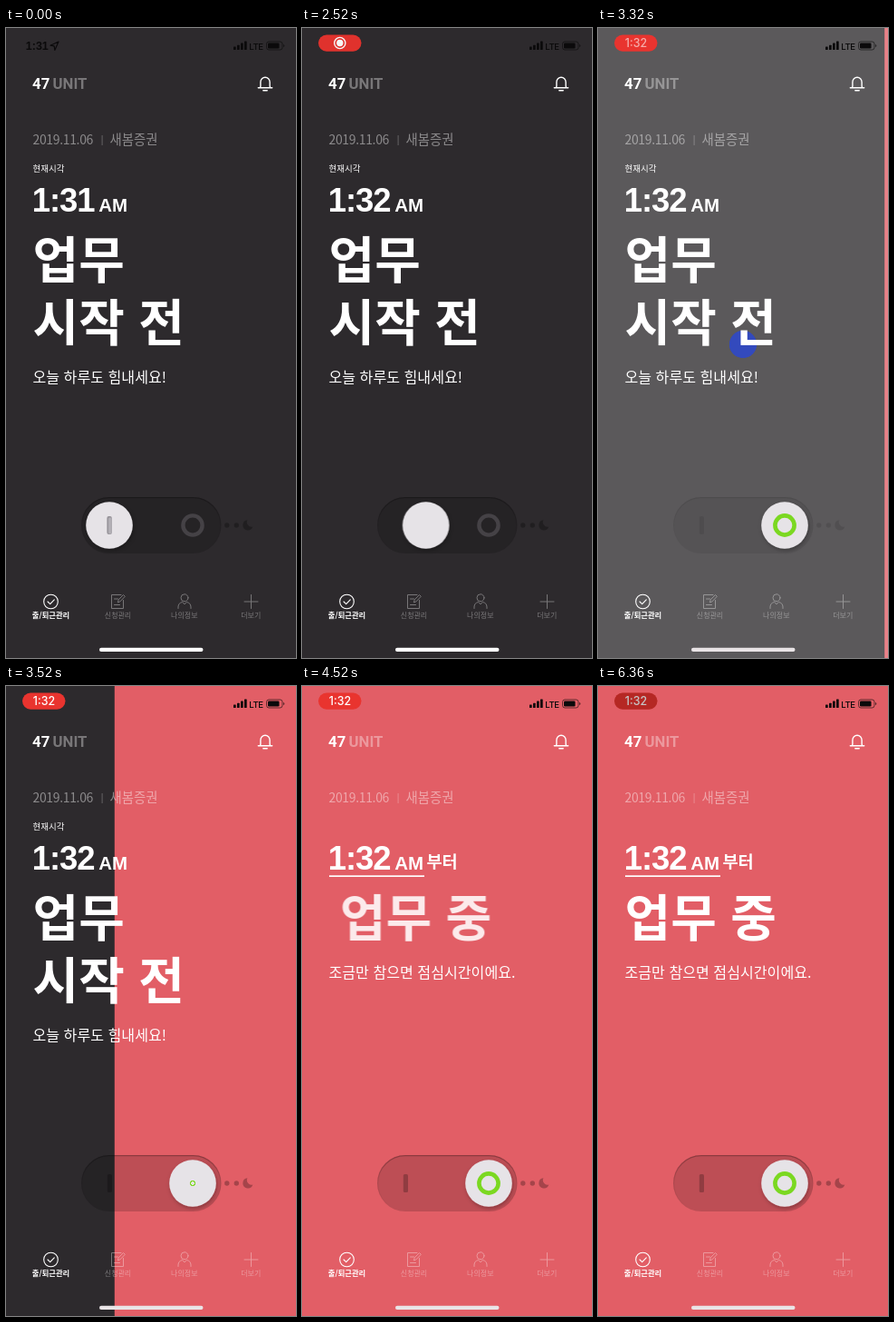
Animation, 320 px wide and 693 px high, one loop 6400 ms. Source, as an HTML page:

```html
<!DOCTYPE html>
<html lang="ko">
<head>
<meta charset="utf-8">
<title>출퇴근 스위치</title>
<style>
  html, body { margin: 0; width: 100%; height: 100%; overflow: hidden; background: #2d2a2d; }
  svg { display: block; width: 100%; height: 100%; }
  text { fill: #fff; font-family: "Noto Sans CJK KR", "Noto Sans CJK", sans-serif; }
  .latin { font-family: "Liberation Sans", Arial, sans-serif; font-weight: 700; }
  .logo { font: 700 16.8px Roboto, sans-serif; }
  .head { font-size: 55px; font-weight: 700; }
  .sub { font-size: 16.1px; font-weight: 300; }
  .date { font-size: 14.4px; font-weight: 300; }
  .tab { font-size: 8px; text-anchor: middle; }
  .dim { opacity: .36; }
  .line { fill: none; stroke: #fff; stroke-linecap: round; stroke-linejoin: round; }

  /* One loop is 6400 ms: 1% = 64 ms */
  .a { animation: 6400ms linear infinite both; }
  #clockOld, #oldMin { animation-name: minuteOut; }
  #newMin { animation-name: minuteIn; }
  #pill { animation-name: pillIn; }
  #rec { animation-name: recOut; }
  #pillTime { animation-name: pillTime; }
  #pulse { animation-name: pulse; }
  #knob { animation-name: knob; }
  #bar { animation-name: barOut; }
  #ring { animation-name: ringIn; }
  #ringSize { animation-name: ringSize; transform-origin: 206px 547px; }
  #veil { animation-name: veil; }
  #loader { animation-name: loader; }
  #ballA { animation-name: ballA; transform-origin: 160px 348px; }
  #ballB { animation-name: ballB; transform-origin: 160px 348px; }
  #red { animation-name: wipe; }
  #before { animation-name: beforeOut; }
  #since { animation-name: sinceIn; }
  #rule { animation-name: ruleIn; transform-origin: 30px 209px; }
  #working { animation-name: workingIn; }
  #lunch { animation-name: lunchIn; }
  #home { animation-name: home; }

  @keyframes minuteOut { 0%, 6.5% { opacity: 1; } 6.51%, 100% { opacity: 0; } }
  @keyframes minuteIn { 0%, 6.5% { opacity: 0; } 6.51%, 100% { opacity: 1; } }
  @keyframes pillIn { 0%, 5% { opacity: 0; } 8%, 100% { opacity: 1; } }
  @keyframes recOut { 0%, 50% { opacity: 1; } 51.6%, 100% { opacity: 0; } }
  @keyframes pillTime { 0%, 51% { opacity: 0; } 52.5%, 100% { opacity: 1; } }
  @keyframes pulse {
    0%, 10% { opacity: 0; } 17% { opacity: .1; } 23.75% { opacity: 0; }
    34% { opacity: .1; } 42% { opacity: 0; } 48.75% { opacity: .07; }
    52%, 70.6% { opacity: 0; } 80% { opacity: .16; } 90% { opacity: 0; }
    99.4%, 100% { opacity: .22; }
  }
  @keyframes knob {
    0%, 37.5% { transform: none; animation-timing-function: ease-in-out; }
    43%, 100% { transform: translateX(92px); }
  }
  @keyframes barOut { 0%, 37.5% { opacity: 1; } 39%, 100% { opacity: 0; } }
  @keyframes ringIn { 0%, 41% { opacity: 0; } 43%, 100% { opacity: 1; } }
  @keyframes ringSize {
    0%, 52.3% { transform: none; } 55% { transform: scale(.23); animation-timing-function: ease-out; }
    61%, 100% { transform: none; }
  }
  @keyframes veil {
    0%, 45.6% { opacity: 0; } 48.75% { opacity: .115; } 51.9% { opacity: .22; }
    53.75%, 100% { opacity: 0; }
  }
  @keyframes loader {
    0%, 45.6% { opacity: 0; } 47%, 52% { opacity: .85; } 53.5%, 100% { opacity: 0; }
  }
  @keyframes ballA {
    0%, 45.6% { transform: scale(.6); } 48.75% { transform: translate(0, -7px) scale(.73); }
    51.8%, 100% { transform: none; }
  }
  @keyframes ballB {
    0%, 45.6% { transform: scale(.6); } 48.75% { transform: translate(2px, 10px) scale(.66); }
    51.8%, 100% { transform: none; }
  }
  @keyframes wipe {
    0%, 51.4% { transform: translateX(320px); animation-timing-function: ease-in-out; }
    57.7%, 100% { transform: none; }
  }
  @keyframes beforeOut { 0%, 58% { opacity: 1; } 62%, 100% { opacity: 0; } }
  @keyframes sinceIn { 0%, 61% { opacity: 0; } 65%, 100% { opacity: 1; } }
  @keyframes ruleIn {
    0%, 61% { transform: scaleX(0); animation-timing-function: ease-out; }
    66%, 100% { transform: none; }
  }
  @keyframes workingIn {
    0%, 65.6% { opacity: 0; transform: translateX(36px); }
    70.6% { opacity: .87; transform: translateX(12.5px); animation-timing-function: ease-out; }
    76%, 100% { opacity: 1; transform: none; }
  }
  @keyframes lunchIn { 0%, 64% { opacity: 0; } 69%, 100% { opacity: 1; } }
  @keyframes home { 0%, 46% { fill: #fff; } 52%, 100% { fill: #e9e4e6; } }
</style>
</head>
<body>
<svg viewBox="0 0 320 693" preserveAspectRatio="none">
  <defs>
    <linearGradient id="inset" x1="0" y1="0" x2="0" y2="1">
      <stop offset="0" stop-opacity=".26"/>
      <stop offset=".5" stop-opacity=".08"/>
      <stop offset="1" stop-opacity="0"/>
    </linearGradient>
    <filter id="shade" x="-30%" y="-30%" width="160%" height="160%">
      <feDropShadow dx="1" dy="2" stdDeviation="2" flood-opacity=".28"/>
    </filter>
  </defs>

  <!-- Backdrop -->
  <rect width="320" height="693" fill="#2d2a2d"/>
  <rect id="red" class="a" width="320" height="693" fill="#e25e66"/>

  <!-- Switch track -->
  <rect x="83" y="516" width="154.5" height="62" rx="31" opacity=".16"/>
  <rect x="83.6" y="516.6" width="153.3" height="60.8" rx="30.4" fill="none" stroke="url(#inset)" stroke-width="1.3"/>
  <rect x="111.8" y="537" width="5.2" height="20" rx="1.5" opacity=".24"/>
  <circle cx="206" cy="547" r="10.6" fill="none" stroke="#454246" stroke-width="4.4"/>
  <g opacity=".27">
    <circle cx="243.8" cy="547" r="2.7"/>
    <circle cx="254.3" cy="547" r="2.7"/>
    <path d="M266.5 541.3a5.6 5.6 0 1 0 5.8 7.2a5 5 0 0 1-5.8-7.2z"/>
  </g>

  <!-- Loading -->
  <rect id="veil" class="a" width="320" height="693" fill="#fff"/>
  <g id="loader" class="a" fill="#2c48cf">
    <circle id="ballA" class="a" cx="160" cy="348" r="15"/>
    <circle id="ballB" class="a" cx="160" cy="348" r="15"/>
  </g>

  <!-- Status bar -->
  <g id="clockOld" class="a">
    <text class="latin" x="21.8" y="24" font-size="12.5" style="fill:#0b0a0b">1:31</text>
    <path d="M58 15l-9 4.2 4.2.7.7 4.4z" fill="none" stroke="#0b0a0b" stroke-width="1.2" stroke-linejoin="round"/>
  </g>
  <g id="pill" class="a">
    <rect x="18" y="7.5" width="47.5" height="18.2" rx="9.1" fill="#e9342f"/>
    <g id="rec" class="a">
      <circle cx="41.8" cy="16.5" r="6.1" fill="none" stroke="#fff" stroke-width="1.4"/>
      <circle cx="41.8" cy="16.5" r="3.7" fill="#fff"/>
    </g>
    <text id="pillTime" class="a" x="42" y="20.9" text-anchor="middle" style="font:500 12.4px Inter, sans-serif">1:32</text>
    <rect id="pulse" class="a" x="18" y="7.5" width="47.5" height="18.2" rx="9.1"/>
  </g>
  <g fill="#0b0a0b">
    <rect x="251" y="20.5" width="2.7" height="3.5" rx=".6"/>
    <rect x="255" y="18.7" width="2.7" height="5.3" rx=".6"/>
    <rect x="259" y="16.6" width="2.7" height="7.4" rx=".6"/>
    <rect x="263" y="14.5" width="2.7" height="9.5" rx=".6"/>
    <text x="268.2" y="23.6" style="font:500 9.6px Inter, sans-serif;fill:#0b0a0b" letter-spacing="-.3">LTE</text>
    <rect x="287.5" y="15" width="17.5" height="9" rx="2.6" fill="none" stroke="#0b0a0b" stroke-opacity=".6"/>
    <rect x="289" y="16.5" width="12.5" height="6" rx="1.3"/>
    <path d="M306 18v3q1.3-.4 1.3-1.5t-1.3-1.5z" opacity=".6"/>
  </g>

  <!-- Header -->
  <text class="logo" x="29" y="67.3">47</text>
  <text class="logo dim" x="51.5" y="67.3">UNIT</text>
  <path class="line" stroke-width="1.4" d="M278.3 65.8h15.4M280.4 65.6l.5-1.6v-4.6a5.1 5.1 0 0 1 10.2 0v4.6l.5 1.6M283.8 68.8h4.4"/>
  <g opacity=".45">
    <text x="29.5" y="128" font-size="14" font-weight="300" letter-spacing="-.35">2019.11.06</text>
    <rect x="105.6" y="118" width="1" height="11" fill="#fff" opacity=".6"/>
    <text class="date" x="114.5" y="128">새봄증권</text>
  </g>

  <!-- Time -->
  <g font-size="36.5" letter-spacing="-1.1">
    <text id="oldMin" class="a latin" x="28.8" y="202.3">1:31</text>
    <text id="newMin" class="a latin" x="28.8" y="202.3">1:32</text>
  </g>
  <text class="latin" x="102.3" y="202" font-size="20.5">AM</text>

  <!-- Messages -->
  <g id="before" class="a">
    <text x="29.5" y="158.3" font-size="9.5">현재시각</text>
    <text class="head" x="29.6" y="275.3">업무</text>
    <text class="head" x="29.6" y="343.8">시작 전</text>
    <text class="sub" x="29.5" y="390">오늘 하루도 힘내세요!</text>
  </g>
  <text id="since" class="a" x="137.5" y="200.3" font-size="18.6" font-weight="700">부터</text>
  <rect id="rule" class="a" x="30" y="208.3" width="105" height="1.7" fill="#fff"/>
  <text id="working" class="a head" x="29.6" y="275.3">업무 중</text>
  <text id="lunch" class="a sub" x="29.5" y="321.4">조금만 참으면 점심시간이에요.</text>

  <!-- Switch knob -->
  <circle id="knob" class="a" cx="114" cy="547" r="25.8" fill="#e6e3e7" filter="url(#shade)"/>
  <g id="bar" class="a">
    <rect x="111.4" y="537" width="5.4" height="20" rx="2" fill="#969399"/>
    <rect x="113" y="538.4" width="3.6" height="18" rx="1.5" fill="#b2afb5"/>
  </g>
  <g id="ring" class="a">
    <circle id="ringSize" class="a" cx="206" cy="547" r="10.6" fill="none" stroke="#7bd821" stroke-width="4.6"/>
  </g>

  <!-- Tab bar -->
  <g class="line">
    <circle cx="49.5" cy="631" r="7.8" stroke-width="1.1"/>
    <path d="M46 631l2.7 2.6 4.6-4.8" stroke-width="1.1"/>
    <g class="dim">
      <path d="M127 623.5h-10.5v15h13v-9M119.5 628h4M119.5 634.5h6M123.5 631.5l.7-2.6 5.3-5.4 1.8 1.8-5.2 5.4z"/>
      <circle cx="197" cy="626.8" r="4"/>
      <path d="M190 638.5v-1.5q0-4.5 4.6-5.5l2.4 2.3 2.4-2.3q4.6 1 4.6 5.5v1.5"/>
      <path d="M270.5 623.5v15M263 631h15"/>
    </g>
  </g>
  <text class="tab" x="49.5" y="649" style="font-size:8.3px;font-weight:700">출/퇴근관리</text>
  <g class="dim">
    <text class="tab" x="123.5" y="649">신청관리</text>
    <text class="tab" x="196.8" y="649">나의정보</text>
    <text class="tab" x="270.3" y="649">더보기</text>
  </g>
  <rect id="home" class="a" x="103" y="681.8" width="114.5" height="4.2" rx="2.1"/>
</svg>
</body>
</html>
```
